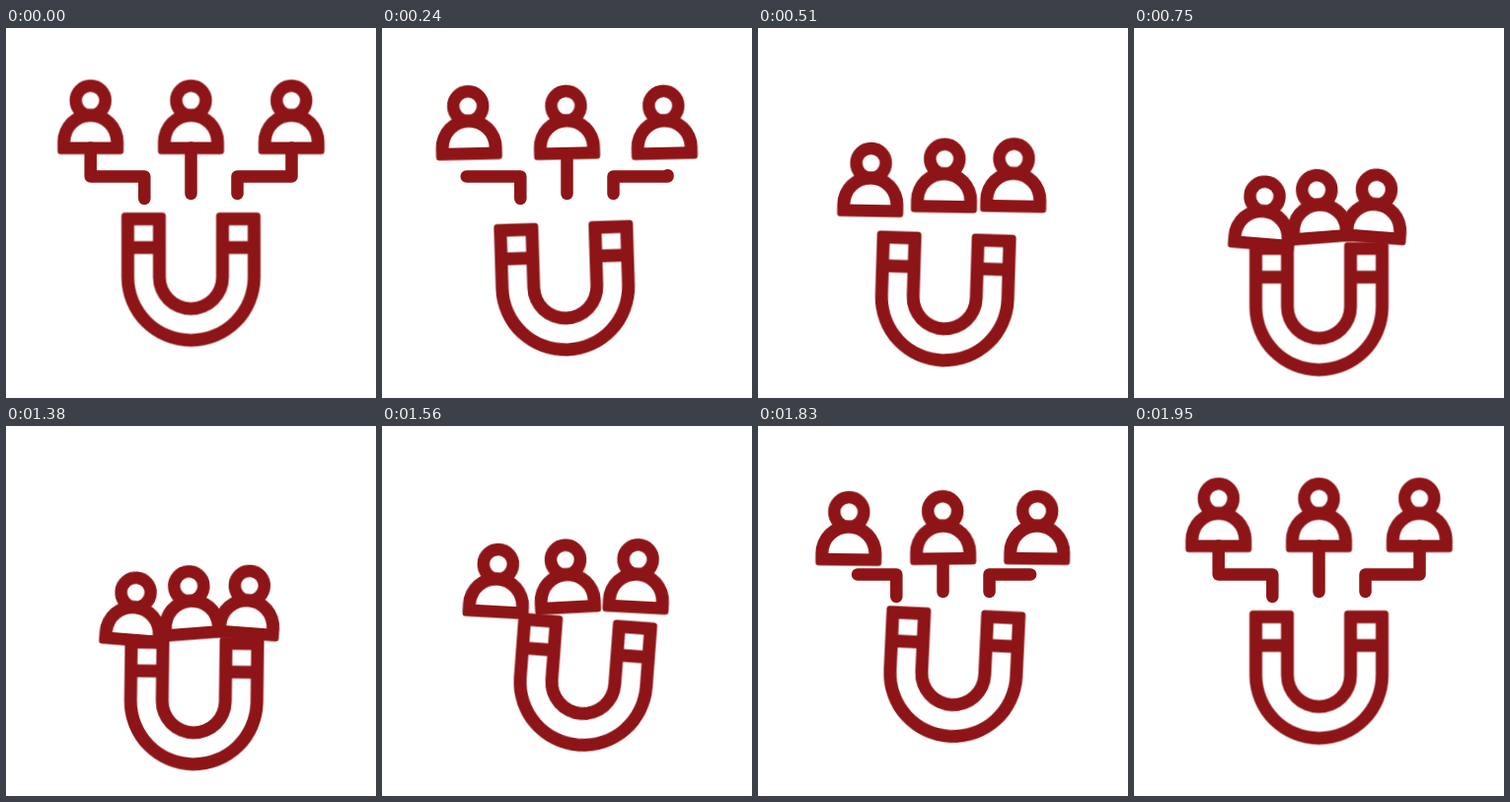
Animation, 375 px wide and 375 px high, one loop 2.73 s. Source, as an HTML page without scripts:

```html
<!DOCTYPE html>
<html lang="en">
<head>
<meta charset="utf-8">
<title>Magnet attracting people</title>
<style>
  html, body { margin: 0; width: 100%; height: 100%; overflow: hidden; background: #fff; }
  svg { display: block; width: 100%; height: 100%; }

  .person, .drop, .sway, .wire { animation: 2730ms linear infinite; }

  .wire {
    fill: none; stroke: #8e1517; stroke-width: 12.5;
    stroke-linecap: round; stroke-linejoin: round;
    stroke-dasharray: 1 3;
    animation-name: trim;
  }
  .person { animation-name: pull; }
  .drop { animation-name: drop; }
  .sway { animation-name: sway; }

  /* 0-750 ms pull in, 1350-1950 ms return */
  @keyframes pull {
    0% { transform: none; animation-timing-function: cubic-bezier(.6, 0, .8, .2); }
    8.791% {
      transform: translate(calc(var(--x) * .06), calc(var(--y) * .058)) rotate(-1.3deg);
      animation-timing-function: cubic-bezier(.33, .14, .67, .64);
    }
    18.681% {
      transform: translate(calc(var(--x) * .65), calc(var(--y) * .652)) rotate(1deg);
      animation-timing-function: cubic-bezier(.33, .5, .67, .87);
    }
    27.473%, 49.451% {
      transform: translate(var(--x), var(--y)) rotate(var(--r));
      animation-timing-function: cubic-bezier(.25, .05, .75, .95);
    }
    71.429%, 100% { transform: translate(0px, 0px) rotate(0deg); }
  }

  @keyframes trim {
    0% { stroke-dashoffset: 0; animation-timing-function: cubic-bezier(.4, .2, .7, .6); }
    8.791% { stroke-dashoffset: -.27; }
    18.2%, 59.3% { stroke-dashoffset: -1.1; animation-timing-function: cubic-bezier(.4, .2, .7, .5); }
    62.637% { stroke-dashoffset: -.91; animation-timing-function: cubic-bezier(.33, .33, .7, .8); }
    71.429%, 100% { stroke-dashoffset: 0; }
  }

  @keyframes drop {
    0%, 71.429%, 100% { transform: translateY(0); }
    27.473%, 49.451% { transform: translateY(30px); }
  }

  @keyframes sway {
    0%, 27.473%, 49.451% {
      transform: translate(0px, 0px) rotate(0deg);
      animation-timing-function: cubic-bezier(.39, .575, .565, 1);
    }
    6.868% {
      transform: translate(-1.9px, 0px) rotate(-2deg);
      animation-timing-function: cubic-bezier(.37, 0, .63, 1);
    }
    20.604% {
      transform: translate(1.9px, 0px) rotate(2deg);
      animation-timing-function: cubic-bezier(.47, 0, .745, .715);
    }
    60.44% {
      transform: translate(18px, -13.5px) rotate(4.7deg);
      animation-timing-function: cubic-bezier(.47, 0, .745, .715);
    }
    71.429%, 100% { transform: translate(0px, 0px) rotate(0deg); }
  }
</style>
</head>
<body>
<svg viewBox="0 0 375 375" fill="#8e1517" fill-rule="evenodd">
  <defs>
    <g id="person">
      <circle cy="-48" r="15" fill="none" stroke="#8e1517" stroke-width="12.5"/>
      <path d="M-33.5-6a33.5 33.5 0 0 1 67 0v9a3.5 3.5 0 0 1-3.5 3.5h-60a3.5 3.5 0 0 1-3.5-3.5z
               M-20.5-6a20.5 20.5 0 0 1 41 0z"/>
    </g>
  </defs>

  <path class="wire" pathLength="1" d="M85.7 121.5V150.5H140.3V173"/>
  <path class="wire" pathLength="1" d="M187.5 121.5V168"/>
  <path class="wire" pathLength="1" d="M289.5 121.5V150.5H234.5V168"/>

  <g transform="translate(187.5 252.5)">
    <g class="drop">
      <path class="sway" d="M-70.5 0V-62a3.5 3.5 0 0 1 3.5-3.5h38a3.5 3.5 0 0 1 3.5 3.5V0a25.5 25.5 0 0 0 51 0V-62a3.5 3.5 0 0 1 3.5-3.5h38a3.5 3.5 0 0 1 3.5 3.5V0a70.5 70.5 0 0 1-141 0z
        M-57.5-52.5h19v16h-19z M38.5-52.5h19v16h-19z
        M-57.5-23.5h19V0a38.5 38.5 0 0 0 77 0v-23.5h19V0a57.5 57.5 0 0 1-115 0z"/>
    </g>
  </g>

  <g transform="translate(85.7 121.5)">
    <use class="person" href="#person" style="--x:43px;--y:97px;--r:4.6deg"/>
  </g>
  <g transform="translate(187.5 121.5)">
    <use class="person" href="#person" style="--x:1.5px;--y:90.5px;--r:-4.4deg"/>
  </g>
  <g transform="translate(289.3 121.5)">
    <use class="person" href="#person" style="--x:-47px;--y:90px;--r:4.4deg"/>
  </g>
</svg>
</body>
</html>
```
